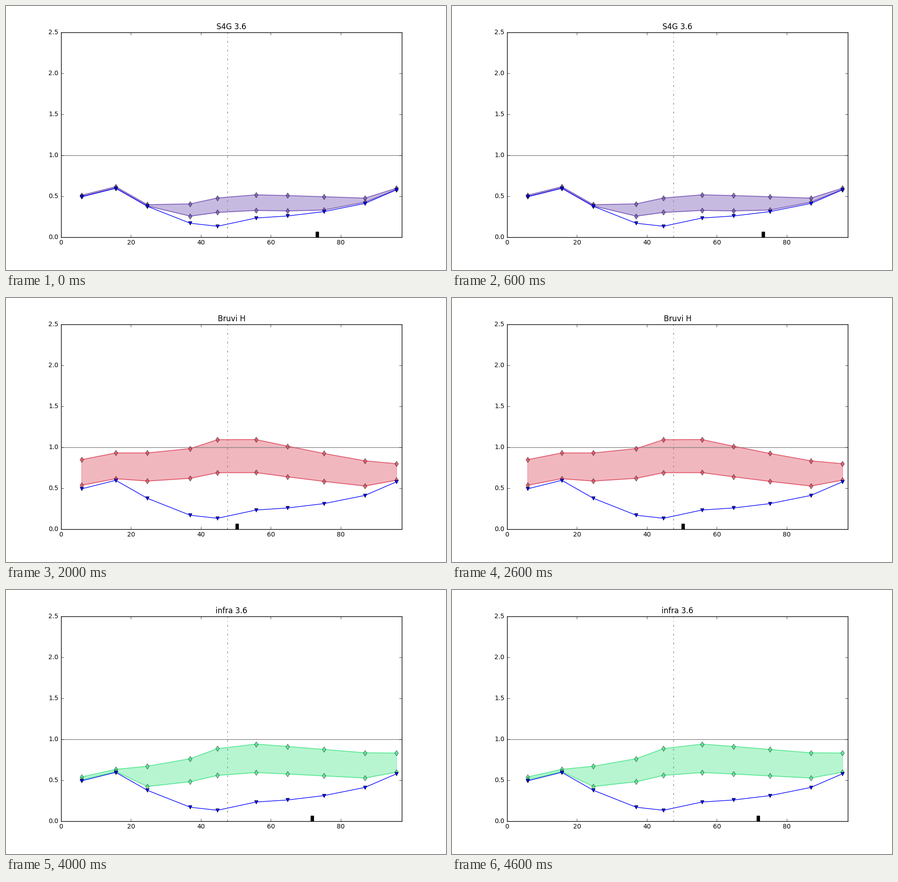
Recreate the animation shown at these times as a matplotlib script. Size 966x580 px, loop 5000 ms.

```python
import matplotlib.pyplot as plt
import numpy as np
from matplotlib.animation import FuncAnimation
from matplotlib.patches import Rectangle

plt.style.use("classic")
plt.rcParams.update({
    "font.family": "DejaVu Sans",
    "font.size": 10,
    "figure.facecolor": "white",
    "savefig.dpi": "figure",
})

DPI = 100
BAR_W, BAR_H = .8, .066
LOWER_RATIO = .631

# Key points: positions, baseline curve and the profile shared by all bands
X = np.array([5.83, 15.66, 24.7, 36.95, 44.74, 55.76, 64.8, 75.15, 86.88, 95.93])
BASE = np.array([.49, .595, .375, .168, .131, .232, .257, .31, .41, .577])
PROFILE = np.array([.67, .735, .735, .777, .863, .864, .8, .73, .659, .631])

# title, colour, bar centre, profile gain at x = 0, gain per unit of x
BANDS = [
    ("S4G 3.6", "#7353b4", 73.2, .374, .004),
    ("Bruvi J", "#c5a5c8", 49.9, 1, 0),
    ("Bruvi H", "#de4b5f", 50.25, 1.265, 0),
    ("Bruvi K", "#826c4e", 54.6, 1.255, .0021),
    ("infra 3.6", "#4be68c", 71.8, .77, .0057),
]


def bounds(gain, slope):
    """Upper and lower edge of a band, both kept just above the baseline."""
    upper = np.maximum(PROFILE * (gain + slope * X), BASE + .02)
    margin = np.minimum((upper - BASE) / 4, .02)
    lower = np.maximum(LOWER_RATIO * upper, BASE + margin)
    return upper, lower


fig = plt.figure(figsize=(966 / DPI, 580 / DPI), dpi=DPI)
ax = fig.add_axes([.125, .125, .775, .775])
ax.set_xlim(0, 97.5)
ax.set_ylim(0, 2.5)
ax.set_xticks(range(0, 81, 20))
ax.set_yticks(np.arange(0, 2.6, .5))

ax.axhline(1, color="gray")
ax.axvline(47.6, color="gray", ls="-.")
fill = ax.fill_between(X, BASE, BASE, alpha=.4)
edges = [ax.plot(X, BASE, "d-", lw=1.3, alpha=.8)[0] for _ in range(2)]
ax.plot(X, BASE, "bv-")
bar = ax.add_patch(Rectangle((0, 0), BAR_W, BAR_H, color="black", zorder=2))
title = ax.set_title("")


def update(i):
    name, color, centre, gain, slope = BANDS[i]
    upper, lower = bounds(gain, slope)
    title.set_text(name)
    bar.set_x(centre - BAR_W / 2)
    fill.set_verts([np.r_[np.c_[X, lower], np.c_[X, upper][::-1]]])
    fill.set_color(color)
    for line, y in zip(edges, (upper, lower)):
        line.set_ydata(y)
        line.set_color(color)
        line.set_markerfacecolor(color)
    return title, bar, fill, *edges


anim = FuncAnimation(fig, update, frames=len(BANDS), interval=1000,
                     repeat=True, repeat_delay=0, blit=False)
plt.show()
```
